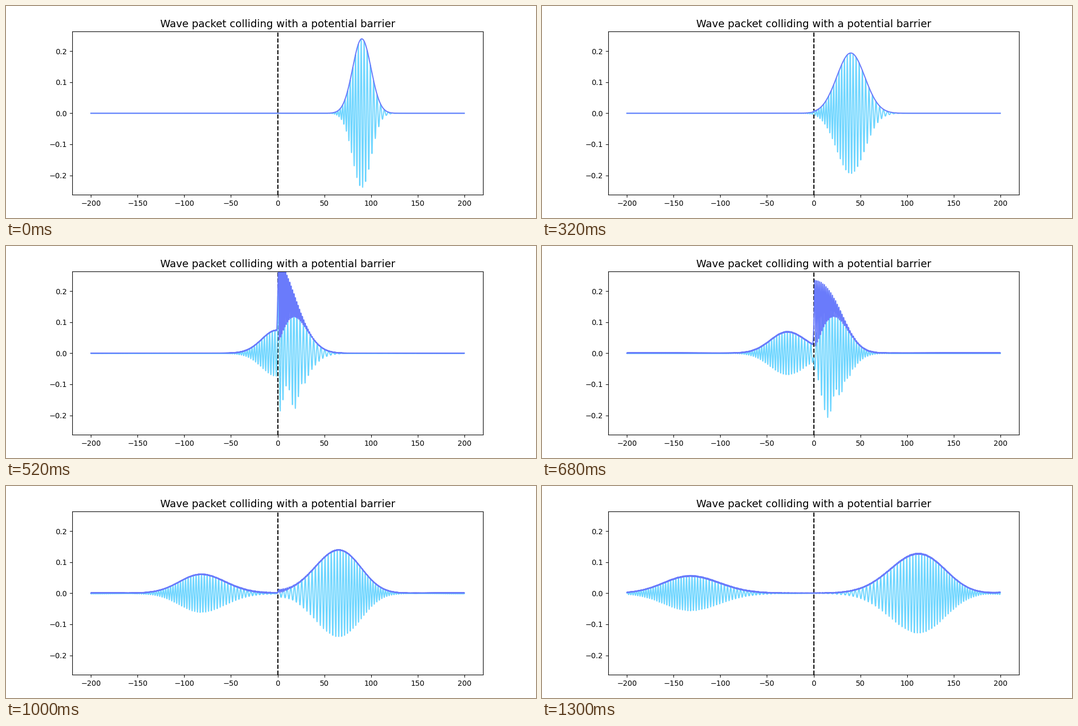
A matplotlib script that plays this animation: 1000x400 px, repeating every 1320 ms.

```python
import numpy as np
import matplotlib.pyplot as plt
from matplotlib.animation import FuncAnimation

plt.rcParams["font.family"] = "DejaVu Sans"

FRAMES, INTERVAL = 66, 20
HALF_WIDTH, POINTS = 200, 4000
FRAME_TIME, SUBSTEPS = 1.575, 60

# Gaussian packet that has already spread by a factor sqrt(1 + SPREAD^2)
CENTRE, MOMENTUM, SIGMA, SPREAD, PHASE = 90.2, 2.0, 3.2, 1.93, -1.4
BARRIER_HEIGHT, BARRIER_HALF = 2.18, 1.0

dx = 2 * HALF_WIDTH / POINTS
x = -HALF_WIDTH + dx * np.arange(POINTS)
k = 2 * np.pi * np.fft.fftfreq(POINTS, dx)


def initial_packet():
    u = x - CENTRE
    peak = (2 * np.pi * SIGMA**2 * (1 + SPREAD**2)) ** -0.25
    envelope = np.exp(-u**2 / (4 * SIGMA**2 * (1 + 1j * SPREAD)))
    return peak * envelope * np.exp(1j * (PHASE - MOMENTUM * u))


def evolve():
    """Split-step solution of the Schrodinger equation, one state per frame."""
    dt = FRAME_TIME / SUBSTEPS
    inside = np.clip((BARRIER_HALF - np.abs(x)) / dx + 0.5, 0, 1)
    half_kick = np.exp(-0.5j * dt * BARRIER_HEIGHT * inside)
    drift = np.exp(-0.5j * dt * k**2)
    psi = initial_packet()
    states = [psi]
    for _ in range(FRAMES - 1):
        for _ in range(SUBSTEPS):
            psi = half_kick * np.fft.ifft(drift * np.fft.fft(half_kick * psi))
        states.append(psi)
    return states


states = evolve()

fig, ax = plt.subplots(figsize=(10, 4), dpi=100)
real_line, = ax.plot(x, states[0].real, color="#70d6ff", lw=1.5)
abs_line, = ax.plot(x, np.abs(states[0]), color="#6a7bfb", lw=1.5)
ax.axvline(0, color="black", ls="--", lw=1.5, zorder=1.9)
ax.set_xlim(-220, 220)
ax.set_ylim(ax.get_ylim())
ax.set_title("Wave packet colliding with a potential barrier", fontsize=14)


def update(frame):
    psi = states[frame]
    real_line.set_ydata(psi.real)
    abs_line.set_ydata(np.abs(psi))
    return real_line, abs_line


anim = FuncAnimation(fig, update, frames=FRAMES, interval=INTERVAL, repeat=True)
plt.show()
```
